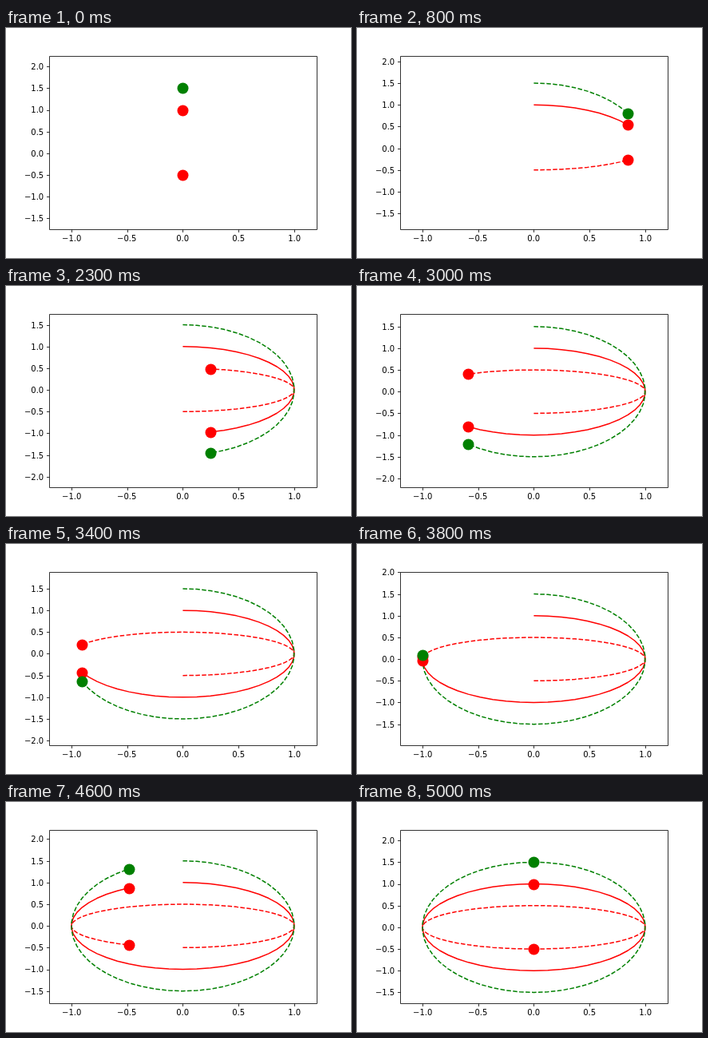
An HTML page with a canvas for the animation above (5.1 s loop, 432 px wide and 288 px high).

```html
<!DOCTYPE html>
<html lang="en">
<head>
<meta charset="utf-8">
<style>
  html, body { margin: 0; overflow: hidden; background: #fff; }
  canvas { display: block; }
</style>
</head>
<body>
<canvas id="plot" width="432" height="288"></canvas>
<script>
const ctx = document.getElementById('plot').getContext('2d');
const STEP = 100, STEPS = 50;
const BOX = { left: 54, right: 388.8, top: 34.56, bottom: 252 };
const SCALE_X = (BOX.right - BOX.left) / 2.4;
const SCALE_Y = (BOX.bottom - BOX.top) / 4;

// Each body moves on an ellipse: x = sin(a), y = height * cos(a)
const bodies = [
  { height: 1, color: '#f00', dash: [] },
  { height: -0.5, color: '#f00', dash: [5.55, 2.4] },
  { height: 1.5, color: '#008000', dash: [5.55, 2.4] },
];

const snap = v => Math.round(v) + 0.5;
const angle = i => 2 * Math.PI * i / STEPS;
const label = v => v.toFixed(1).replace('-', '\u2212');
const toX = x => (BOX.left + BOX.right) / 2 + x * SCALE_X;

function line(x1, y1, x2, y2) {
  ctx.beginPath();
  ctx.moveTo(x1, y1);
  ctx.lineTo(x2, y2);
  ctx.stroke();
}

function drawAxes(center, toY) {
  ctx.strokeStyle = ctx.fillStyle = '#000';
  ctx.lineWidth = 0.8;
  ctx.setLineDash([]);
  const left = snap(BOX.left), bottom = snap(BOX.bottom), top = snap(BOX.top);
  ctx.strokeRect(left, top, snap(BOX.right) - left, bottom - top);

  ctx.font = '10px "DejaVu Sans", sans-serif';
  ctx.textAlign = 'center';
  for (let v = -1; v <= 1; v += 0.5) {
    const x = toX(v);
    line(snap(x), bottom, snap(x), bottom + 3.5);
    ctx.fillText(label(v), Math.floor(x + 0.2) + 0.15, 267);
  }
  ctx.textAlign = 'right';
  for (let v = -2; v <= 2; v += 0.5) {
    if (Math.abs(v - center) > 2) continue;
    const y = toY(v);
    line(left - 3.5, snap(y), left, snap(y));
    ctx.fillText(label(v), 47.2, Math.round(y + 3.95));
  }
}

function drawTrail({ height, color, dash }, n, toY) {
  ctx.strokeStyle = color;
  ctx.lineWidth = 1.5;
  ctx.lineJoin = 'round';
  ctx.setLineDash(dash);
  ctx.beginPath();
  for (let i = 0; i <= n; i++) {
    ctx.lineTo(toX(Math.sin(angle(i))), toY(height * Math.cos(angle(i))));
  }
  ctx.stroke();
}

function drawMarker({ height, color }, n, toY) {
  const x = toX(Math.sin(angle(n))), y = toY(height * Math.cos(angle(n)));
  ctx.fillStyle = color;
  ctx.beginPath();
  ctx.arc(snap(x), snap(y), 7, 0, 2 * Math.PI);
  ctx.fill();
}

function draw() {
  const n = Math.floor(performance.now() / STEP) % (STEPS + 1);
  // The view follows the midpoint of the two red bodies
  const center = 0.25 * Math.cos(angle(n));
  const toY = y => (BOX.top + BOX.bottom) / 2 - (y - center) * SCALE_Y;

  ctx.fillStyle = '#fff';
  ctx.fillRect(0, 0, 432, 288);
  for (const body of bodies) drawTrail(body, n, toY);
  for (const body of bodies) drawMarker(body, n, toY);
  drawAxes(center, toY);
  requestAnimationFrame(draw);
}
draw();
</script>
</body>
</html>
```
